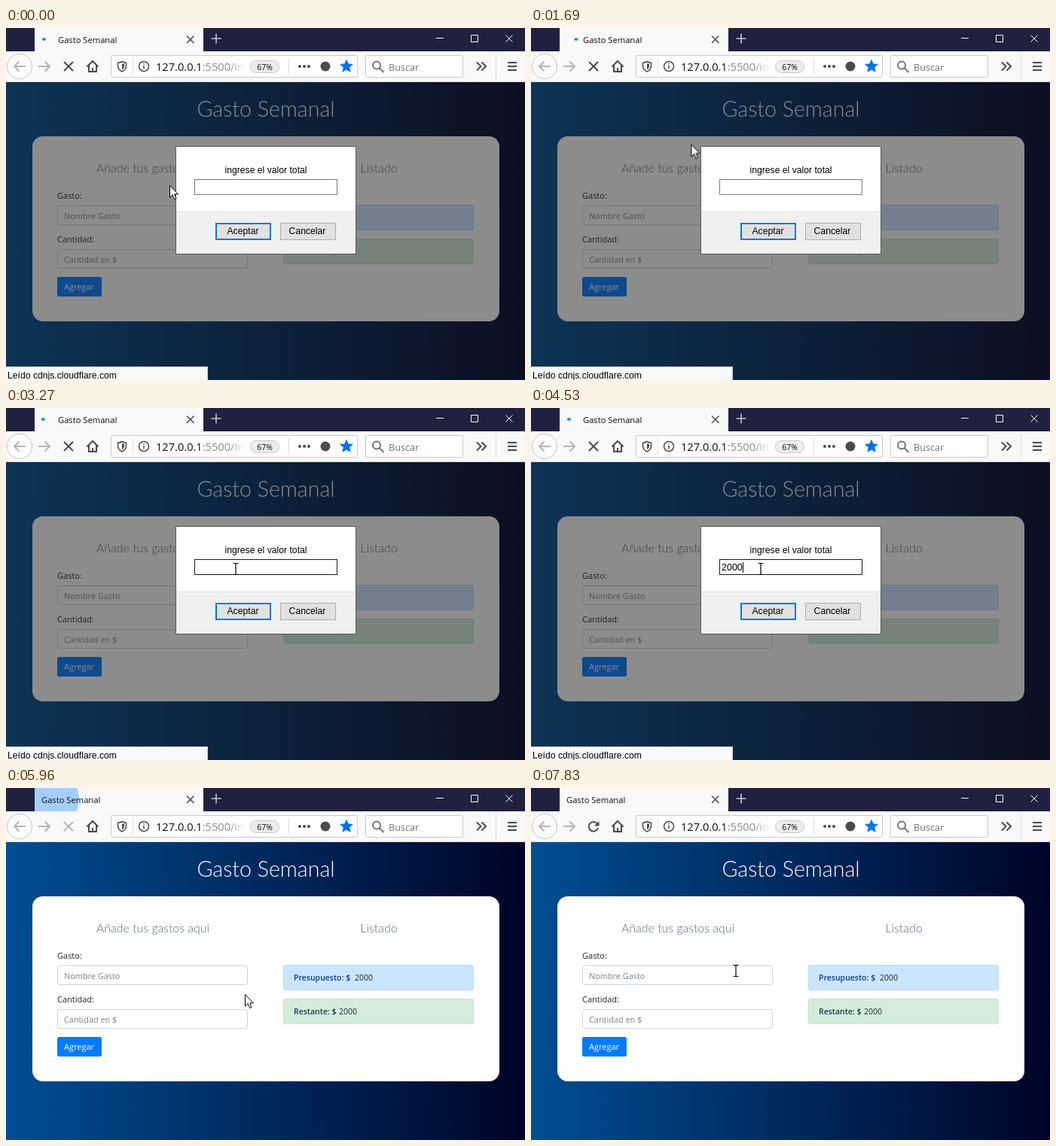
These frames come from a looping animation (689 px wide and 468 px high, 8000 ms). An HTML page:

```html
<!DOCTYPE html>
<html lang="es">
<head>
<meta charset="utf-8">
<title>Gasto Semanal</title>
<style>
html, body { margin: 0; width: 100%; height: 100%; overflow: hidden; background: #000428; }
svg { display: block; }
text { font: 11px 'Open Sans', 'Noto Sans', sans-serif; fill: #212529; }
.tab { font-size: 11.2px; fill: #0c0c0d; }
.url { font-size: 14.6px; fill: #0c0c0d; }
.soft { fill: #8a8a8d; }
.zoom { font-size: 10.5px; fill: #0c0c0d; }
.find { font-size: 12.6px; fill: #737373; }
.status { font-size: 11.4px; fill: #4a4a4f; }
.head { font: 300 28.6px Lato, Inter, sans-serif; fill: #fff; text-anchor: middle; }
.sub { font: 300 15.9px Lato, Inter, sans-serif; fill: #56677c; text-anchor: middle; }
.hint { font-size: 10.9px; fill: #7c848b; }
.sum { font-size: 10.5px; }
.sum .key { font-weight: 600; }
.ask text { font: 12.2px 'Liberation Sans', Arial, sans-serif; fill: #000; }
.mid { text-anchor: middle; }
.icon { fill: none; stroke: #4a4a4f; stroke-width: 2; }
.thin { stroke-width: 1.5; }
.off { stroke: #b4b4b6; }
.white { stroke: #fff; stroke-width: 1; }
.box { fill: #fff; stroke: #c8c8ca; }
.input { fill: #fff; stroke: #ced4da; }

/* One shared loop; keyframes hold unless they set their own timing */
.a { animation: 8s step-end infinite; }
.before { animation-name: before; }
.after { animation-name: after; }
.stop { animation-name: stop; }
.reload { animation-name: reload; }
.burst { animation-name: burst; }
.dot { animation-name: dot; }
.field { animation-name: field; }
.typing { animation-name: typing; }
.caret { animation-name: caret; }
.ok { animation-name: ok; }
.ring { animation-name: ring; }
.click { animation-name: click; }
.pointer { animation-name: pointer; }
.arrow { animation-name: arrow; }
.beam { animation-name: beam; }

@keyframes before { 0% { opacity: 1 } 74.375%, 100% { opacity: 0 } }
@keyframes after { 0% { opacity: 0 } 74.375%, 100% { opacity: 1 } }
@keyframes stop {
  0% { opacity: 1; stroke: #4a4a4f }
  74.375% { opacity: 1; stroke: #b4b4b6 }
  82%, 100% { opacity: 0; stroke: #b4b4b6 }
}
@keyframes reload { 0% { opacity: 0 } 82%, 100% { opacity: 1 } }
@keyframes burst {
  0% { opacity: 0; transform: scale(1) }
  74.375% { opacity: .36; transform: scale(1) }
  76.3% { opacity: .2; transform: scale(2.6) }
  78.3%, 100% { opacity: 0; transform: scale(5) }
}
@keyframes dot {
  0% { transform: translateX(-4px); animation-timing-function: ease-out }
  1.76%, 15.18%, 29.13%, 42.01%, 54.91%, 67.53% {
    transform: translateX(-6px); animation-timing-function: ease-in-out }
  8.38%, 22.15%, 35.58%, 48.46%, 61.24%, 73.79%, 100% {
    transform: translateX(6px); animation-timing-function: ease-in-out }
}
@keyframes field {
  0% { stroke: #7a7a7a } 31% { stroke: #171717 } 60.5%, 100% { stroke: #7a7a7a }
}
@keyframes typing {
  0% { transform: translateX(0) }
  44.875% { transform: translateX(0); animation-timing-function: steps(4, jump-start) }
  60.375%, 100% { transform: translateX(28px) }
}
@keyframes caret { 0% { opacity: 0 } 42.9% { opacity: 1 } 62.375%, 100% { opacity: 0 } }
@keyframes ok {
  0% { fill: #e1e1e1; stroke: #0078d7 }
  66.5% { fill: #e5f1fb; stroke: #0078d7 }
  72.25%, 100% { fill: #cce4f7; stroke: #005499 }
}
@keyframes ring { 0% { opacity: 1 } 66.5%, 100% { opacity: 0 } }
@keyframes click { 0% { opacity: 0 } 72.25% { opacity: .68 } 74.375%, 100% { opacity: 0 } }
@keyframes pointer {
  0% { transform: translate(217px, 209px) }
  1.625% { transform: translate(217px, 209px); animation-timing-function: steps(3, jump-start) }
  7.375% { transform: translate(242px, 8px); animation-timing-function: steps(3, jump-start) }
  13.25% { transform: translate(35px, 20px) }
  15.125% { transform: translate(35px, 20px); animation-timing-function: steps(6, jump-start) }
  27.125% { transform: translate(301px, 222px) }
  29% { transform: translate(305px, 218px) }
  31% { transform: translate(305px, 214px) }
  60.5% { transform: translate(305px, 214px); animation-timing-function: steps(4, jump-start) }
  68.5% { transform: translate(312px, 267px) }
  70.375% { transform: translate(317px, 274px) }
  84.25% { transform: translate(317px, 274px); animation-timing-function: steps(2, jump-start) }
  88.125% { transform: translate(300px, 266px); animation-timing-function: steps(2, jump-start) }
  92% { transform: translate(410px, 234px); animation-timing-function: steps(2, jump-start) }
  95.8% { transform: translate(470px, 304px) }
  95.875% { transform: translate(487px, 291px) }
  97.75%, 100% { transform: translate(272px, 243px) }
}
@keyframes arrow { 0%, 60.5% { opacity: 1 } 29%, 97.75%, 100% { opacity: 0 } }
@keyframes beam { 0%, 60.5% { opacity: 0 } 29%, 97.75%, 100% { opacity: 1 } }
</style>
</head>
<body>
<svg width="689" height="468">
  <defs>
    <linearGradient id="sky"><stop stop-color="#004e92"/><stop offset="1" stop-color="#000428"/></linearGradient>
    <linearGradient id="fade"><stop stop-color="#fff" stop-opacity="0"/><stop offset="1" stop-color="#fff"/></linearGradient>
    <clipPath id="tabClip"><path d="M38 0h224v31H38z"/></clipPath>
  </defs>

  <!-- Page -->
  <rect y="72" width="689" height="396" fill="url(#sky)"/>
  <text class="head" x="345" y="118">Gasto Semanal</text>
  <rect x="35" y="144" width="620" height="246" rx="14" fill="#fff"/>
  <text class="sub" x="195" y="192">Añade tus gastos aqui</text>
  <text class="sub" x="495" y="192">Listado</text>

  <text x="68" y="227">Gasto:</text>
  <rect class="input" x="68.5" y="236.5" width="252" height="25" rx="2.5"/>
  <text class="hint" x="77" y="254">Nombre Gasto</text>
  <text x="68" y="285">Cantidad:</text>
  <rect class="input" x="68.5" y="294.5" width="252" height="25" rx="2.5"/>
  <text class="hint" x="77" y="312">Cantidad en $</text>
  <rect x="68" y="331" width="59" height="26" rx="2.5" fill="#007bff"/>
  <text x="77" y="348" style="fill:#fff">Agregar</text>

  <rect x="368.5" y="235.5" width="252" height="33" rx="2.5" fill="#cce5ff" stroke="#b8daff"/>
  <text class="sum" x="382" y="256"><tspan class="key" fill="#004085">Presupuesto: $</tspan></text>
  <rect x="368.5" y="280.5" width="252" height="33" rx="2.5" fill="#d4edda" stroke="#c3e6cb"/>
  <text class="sum" x="382" y="301"><tspan class="key" fill="#1a3c4d">Restante: $</tspan></text>
  <g class="a after">
    <text class="sum" x="463" y="256">2000</text>
    <text class="sum" x="442" y="301">2000</text>
  </g>

  <!-- Prompt -->
  <g class="a before ask">
    <rect y="72" width="689" height="396" fill="#1a1a1a" opacity=".5"/>
    <rect x="225.5" y="157.5" width="239" height="143" fill="#fff" stroke="#5c5c5c"/>
    <rect x="226" y="244" width="238" height="56" fill="#f0f0f0"/>
    <rect x="226" y="244" width="238" height="1" fill="#dfdfdf"/>
    <text class="mid" x="345" y="193">ingrese el valor total</text>
    <rect class="a field" x="250.5" y="201.5" width="189" height="20" fill="#fff"/>
    <text x="253" y="216" style="font-size:12.5px">2000</text>
    <g class="a typing">
      <rect x="253" y="204" width="32" height="15" fill="#fff"/>
      <rect class="a caret" x="253" y="205" width="1" height="14"/>
    </g>
    <rect class="a ok" x="278.5" y="259.5" width="73" height="22"/>
    <rect class="a ring" x="279.5" y="260.5" width="71" height="20" fill="none" stroke="#0078d7"/>
    <text class="mid" x="314.5" y="274">Aceptar</text>
    <rect x="364.5" y="259.5" width="73" height="22" fill="#e1e1e1" stroke="#adadad"/>
    <text class="mid" x="400" y="274">Cancelar</text>
    <path d="M0 450h268v18H0z" fill="#f9f9fa"/>
    <path d="M0 450.5h267.5V468" fill="none" stroke="#d0d0d2"/>
    <text class="status" x="2" y="466">Leído cdnjs.cloudflare.com</text>
  </g>

  <!-- Tab strip -->
  <rect width="689" height="31" fill="#20213f"/>
  <rect x="38" width="224" height="31" fill="#f9f9fa"/>
  <g clip-path="url(#tabClip)"><g transform="translate(55 15)">
    <circle class="a burst" r="42" fill="#0a84ff"/>
  </g></g>
  <g class="a before">
    <rect class="a dot" x="52" y="13.3" width="5" height="3.4" rx="1.7" fill="#0a84ff"/>
    <text class="tab" x="69" y="20">Gasto Semanal</text>
  </g>
  <text class="tab a after" x="47" y="20">Gasto Semanal</text>
  <path class="icon thin" d="M240 10.500l9.500 9.500m0-9.500l-9.500 9.500"/>
  <path class="icon" style="stroke:#c4c4cf;stroke-width:1.600" d="M272.500 14h13M279 7.500v13"/>
  <path class="icon white" d="M571 13.500h10M617.500 9.500h9v9h-9zM663.500 9.500l9 9m0-9l-9 9"/>

  <!-- Toolbar -->
  <rect y="31" width="689" height="41" fill="#f9f9fa"/>
  <rect y="71" width="689" height="1" fill="#d8d8da"/>
  <circle cx="18" cy="51" r="16.500" fill="#fbfbfc" stroke="#c4c4c6"/>
  <path class="icon off" d="M26 51H11m6.500-6.500L11 51l6.500 6.500M43 51h15m-6.500-6.500L58 51l-6.500 6.500"/>
  <path class="icon a stop" d="M77 45l12 12m0-12L77 57"/>
  <g class="a reload">
    <path class="icon" d="M88 47.500A6.300 6.300 0 1 0 89 53"/>
    <path d="M90.500 44v6.500H84z" fill="#4a4a4f"/>
  </g>
  <path class="icon" d="M107.500 51.500L115 44l7.500 7.500M110 50v8h10v-8M115 58v-5"/>

  <rect class="box" x="139.500" y="36.500" width="327" height="29" rx="2"/>
  <path class="icon thin" d="M154 44.500q3 1.800 5.500 1.800v4q0 5-5.500 7.700q-5.500-2.700-5.500-7.700v-4q2.500 0 5.500-1.800z"/>
  <path d="M154 47q1.500.8 3 1v3q0 2.500-3 4.500z" fill="#4a4a4f"/>
  <path d="M168.500 40v22M375.500 40v22M650.500 34v34" stroke="#dcdcde"/>
  <circle class="icon thin" cx="183" cy="51" r="6.500"/>
  <path class="icon thin" d="M183 50v4.500M183 47v1.500"/>
  <text class="url" x="199" y="57">127.0.0.1<tspan class="soft">:5500/ind</tspan></text>
  <rect x="296" y="40" width="22" height="23" fill="url(#fade)"/>
  <rect x="318" y="40" width="12" height="23" fill="#fff"/>
  <rect x="324.500" y="43.500" width="38" height="16" rx="8" fill="#ededf0" stroke="#c8c8ca"/>
  <text class="zoom mid" x="343.500" y="55.500">67%</text>
  <g fill="#4a4a4f">
    <circle cx="390" cy="51" r="2"/><circle cx="396" cy="51" r="2"/><circle cx="402" cy="51" r="2"/>
    <circle cx="424" cy="51" r="6.500"/>
  </g>
  <path d="M452 42.500l2.300 5.400 5.900.5-4.500 3.900 1.400 5.800-5.100-3.100-5.100 3.100 1.400-5.800-4.500-3.900 5.900-.5z" fill="#0074e0" stroke="#0074e0" stroke-linejoin="round"/>

  <rect class="box" x="477.500" y="36.500" width="129" height="29" rx="2"/>
  <path class="icon" style="stroke:#737373" d="M495.500 53l6 6"/>
  <circle class="icon" style="stroke:#737373" cx="492" cy="49.500" r="5"/>
  <text class="find" x="508" y="57">Buscar</text>
  <path class="icon" d="M625 45.500l5.500 5.500-5.500 5.500M631.500 45.500L637 51l-5.500 5.500M666 46h12M666 51h12M666 56h12"/>

  <!-- Pointer -->
  <circle class="a click" cx="317" cy="272" r="13" fill="#f0ee30"/>
  <g class="a pointer">
    <path class="a arrow" d="M.5.5v15.600l3.600-3.400 2.500 5.900 2.400-1-2.500-5.700h5z" fill="#fff" stroke="#000"/>
    <path class="a beam" d="M-3.500-7.500h2.500q1 0 1 1q0-1 1-1h2.500M0-6.500v13M-3.500 7.500h2.500q1 0 1-1q0 1 1 1h2.500" fill="none" stroke="#000" stroke-width="1.200"/>
  </g>
</svg>
</body>
</html>
```
